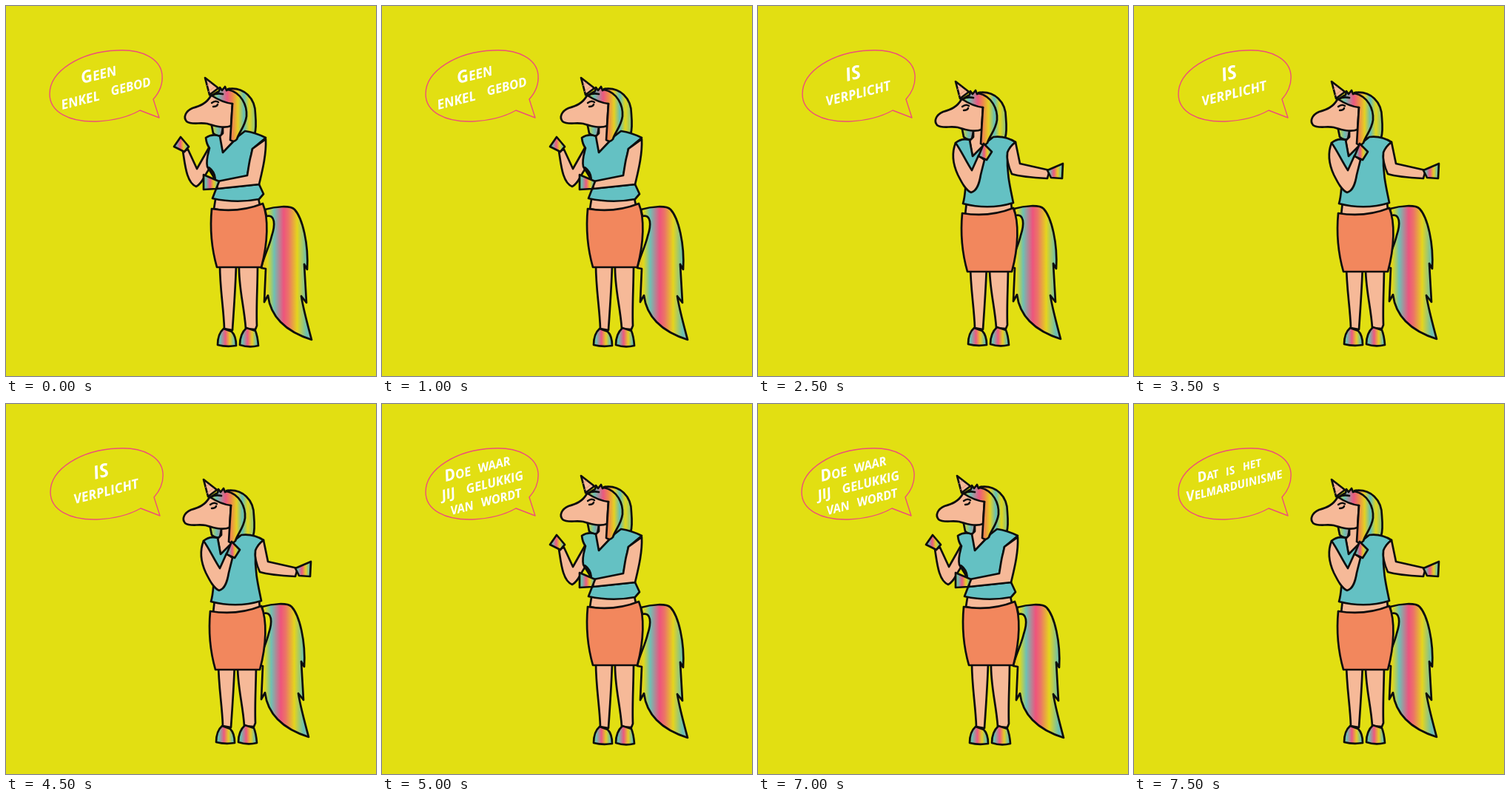
Animation, 500 px wide and 500 px high, one loop 8000 ms. Source, as an HTML page:

```html
<!DOCTYPE html>
<html lang="nl">
<head>
<meta charset="utf-8">
<title>Unicorn with speech bubble</title>
<style>
  html, body { margin: 0; width: 100%; height: 100%; overflow: hidden; background: #e2df12; }
  svg { display: block; width: 100vw; height: 100vh; }
  path { stroke: #0d0d0d; stroke-width: 2.7; stroke-linejoin: round; stroke-linecap: round; fill: none; }
  .skin { fill: #f6b998; }
  .teal { fill: #64c1c3; }
  .skirt { fill: #f2875d; }
  .rainbow { fill: url(#rainbow); }
  .tail { fill: url(#tailFill); }
  .hair { fill: url(#hairFill); }
  .bubble { stroke: #ee4f78; stroke-width: 1.4; }
  text { fill: #fff; font: italic 700 17px "Open Sans", "Noto Sans", sans-serif; }
</style>
</head>
<body>
<svg viewBox="0 0 500 500">
  <defs>
    <linearGradient id="rainbow">
      <stop offset="0" stop-color="#9dc66a"/>
      <stop offset=".14" stop-color="#69bfb4"/>
      <stop offset=".42" stop-color="#ed5a80"/>
      <stop offset=".67" stop-color="#e6cd23"/>
      <stop offset=".92" stop-color="#66bfb5"/>
      <stop offset="1" stop-color="#8fb0ab"/>
    </linearGradient>
    <linearGradient id="tailFill" gradientUnits="userSpaceOnUse" x1="349" x2="410" y1="0" y2="0">
      <stop offset="0" stop-color="#e2c41d"/>
      <stop offset=".07" stop-color="#e2d91a"/>
      <stop offset=".22" stop-color="#6fc0b2"/>
      <stop offset=".43" stop-color="#ee547d"/>
      <stop offset=".54" stop-color="#ec7466"/>
      <stop offset=".73" stop-color="#e5d41d"/>
      <stop offset=".94" stop-color="#68c0b2"/>
      <stop offset="1" stop-color="#80b6af"/>
    </linearGradient>
    <linearGradient id="hairFill" gradientUnits="userSpaceOnUse" x1="277" x2="338" y1="0" y2="0">
      <stop offset="0" stop-color="#e2d61b"/>
      <stop offset=".16" stop-color="#6dbfb4"/>
      <stop offset=".36" stop-color="#ec5880"/>
      <stop offset=".48" stop-color="#ee8a4c"/>
      <stop offset=".6" stop-color="#e5d021"/>
      <stop offset=".73" stop-color="#64c0b8"/>
      <stop offset=".85" stop-color="#e2d61b"/>
      <stop offset="1" stop-color="#79c295"/>
    </linearGradient>

    <path id="bubble" class="bubble" d="M181 141L207 151L199 126C208 116 212 105 211 93C209 72 185 58 150 60C100 62 59 88 59 119C59 143 85 157 122 156C145 155 165 150 181 141Z"/>

    <path id="tail" class="tail" d="M350 275C364 271 384 269 390 275C401 287 409 322 407 356L403 349L406 401L399 392C402 411 408 432 413 451C385 442 358 425 354 391L349 400L351 355L345 354C347 341 355 328 359 311C364 296 364 281 352 284Z"/>

    <g id="legs">
      <path class="skin" d="M289 350C289 382 294 407 295 436L306 438C308 408 310 383 311 350Z"/>
      <path class="skin" d="M315 350C314 380 322 406 324 436L337 437L339 432C338 405 340 380 340 350Z"/>
      <path class="rainbow" d="M294 436Q286 443 286 458Q298 461 311 459Q311 446 305 440Z"/>
      <path class="rainbow" d="M325 435Q316 443 316 458Q328 462 341 459Q340 446 337 439Z"/>
    </g>

    <path id="skirt" class="skirt" d="M278 274Q314 280 347 267C355 286 354 320 345 353H285C277 325 276 295 278 274Z"/>

    <g id="backHair">
      <path class="hair" d="M300 112C322 109 337 125 337 146C338 158 338 167 336 173L305 176L304 130Z"/>
      <path class="hair" d="M277 157L280 172Q285 177 291 175L294 160Z"/>
    </g>

    <g id="head">
      <path class="skin" d="M269 97L287 111L275 120Z"/>
      <path d="M271 108L276 104M273 116L282 109" style="stroke:#d98f76;stroke-width:.8"/>
      <path class="skin" d="M277 121C271 132 262 135 252 138C243 142 239 150 244 156C250 161 262 157 272 159C282 162 294 166 304 162L306 132L292 118Z"/>
      <path class="hair" style="stroke:none" d="M300 113C318 117 326 134 325 149C323 163 315 170 312 180Q308 185 303 181L306 132L294 124Z"/>
      <path class="hair" d="M306 132C297 131 287 127 278 121L288 115L289 110L292 114L296 109L298 114L302 112"/>
      <path d="M278 121Q285 117 293 119"/>
      <path d="M278 131Q283 127 287 130M280 136Q285 136 286 133" style="stroke-width:2.4"/>
      <path d="M300 113C318 117 326 134 325 149C323 163 315 170 312 180Q308 185 303 181L306 132"/>
    </g>
  </defs>

  <g class="pose">
    <use href="#bubble"/>
    <use href="#tail"/>
    <use href="#legs"/>
    <path class="skin" d="M284 255L281 274L312 279L343 269L340 255Z"/>
    <use href="#skirt"/>
    <use href="#backHair"/>
    <path class="skin" d="M293 160V172L287 178L293 200L316 173L304 161Z"/>
    <path class="skin" d="M239 196C242 215 244 239 257 244C265 240 267 231 274 221L275 190L258 220L246 194Z"/>
    <path class="teal" d="M270 178Q279 172 289 176L293 198L314 176L323 169Q337 171 351 178L333 193L326 230L284 240C283 232 277 226 272 217C270 208 273 200 275 192Q271 187 270 178Z"/>
    <path d="M274 219Q281 224 282 233" style="stroke-width:4"/>
    <path class="teal" d="M284 247L342 241L348 254L342 261Q311 267 279 260Z"/>
    <path class="skin" d="M351 180C352 201 346 224 342 241L285 247L286 237L326 229C328 217 329 208 331 202L333 193Z"/>
    <path class="rainbow" d="M267 228L288 237L284 247L267 248Z"/>
    <path class="rainbow" d="M236 177L247 190L241 197L227 190Z"/>
    <use href="#head"/>
  </g>

  <g class="pose" style="display:none">
    <use href="#bubble" x="1"/>
    <use href="#tail" x="-4" y="-1"/>
    <use href="#legs" x="-2" y="-1"/>
    <path class="skin" d="M282 264L280 282L312 286L343 276L342 264Z"/>
    <use href="#skirt" x="-2" y="6"/>
    <use href="#backHair" x="-2" y="5"/>
    <path class="skin" d="M291 165V177L286 182L290 204L316 180L302 166Z"/>
    <path class="teal" d="M267 185Q275 178 286 181L290 203L308 185L318 177Q334 175 348 184Q338 191 337 202C336 226 341 246 345 266Q312 276 277 267C280 257 280 247 281 238Z"/>
    <path class="skin" d="M348 184L354 213L394 222L391 233C372 232 356 231 343 227C338 216 336 206 337 198Q340 190 348 184Z"/>
    <path class="rainbow" d="M391 222L412 213L411 233L396 232Z"/>
    <use href="#head" x="-2" y="5"/>
    <path class="skin" d="M267 185C261 200 264 215 270 228C276 240 281 249 288 252C296 250 299 240 301 228L306 208L298 202L289 222C281 210 275 196 267 185Z"/>
    <path class="rainbow" d="M305 186L316 197L309 208L298 203Z"/>
  </g>

  <g id="words"></g>
</svg>
<script>
  const STEP = 500, LINE = 2500, LOOP = 8000;

  // Each word: x, baseline y, size, first-letter size, text
  const lines = [
    [[103, 105, 18, 23, "GEEN"], [76, 140, 18, 18, "ENKEL"], [143, 121, 17, 17, "GEBOD"]],
    [[120, 102, 25, 25, "IS"], [93, 135, 18, 18, "VERPLICHT"]],
    [[86, 105, 17, 22, "DOE"], [131, 93, 16.5, 16.5, "WAAR"], [82, 130, 19, 19, "JIJ"],
     [115, 121, 17, 17, "GELUKKIG"], [94, 150, 16.5, 16.5, "VAN"], [135, 139, 16.5, 16.5, "WORDT"]],
    [[87, 106, 15, 19, "DAT"], [125, 97, 15, 15, "IS"], [148, 90, 14.5, 14.5, "HET"],
     [72, 132, 15.5, 19, "VELMARDUINISME"]]
  ];

  const word = ([x, y, size, first, s]) =>
    `<text transform="translate(${x} ${y}) rotate(-14)" style="font-size:${size}px">` +
    `<tspan style="font-size:${first}px">${s[0]}</tspan>${s.slice(1)}</text>`;

  document.getElementById("words").innerHTML =
    lines.map(l => `<g class="line">${l.map(word).join("")}</g>`).join("");

  const poses = document.querySelectorAll(".pose");
  const texts = document.querySelectorAll(".line");
  const show = (list, n) => list.forEach((el, i) => el.style.display = i === n ? "" : "none");

  const start = performance.now();
  function draw() {
    const t = (performance.now() - start) % LOOP;
    show(poses, Math.floor(t / STEP) % 2);
    show(texts, Math.floor(t / LINE));
    requestAnimationFrame(draw);
  }
  draw();
</script>
</body>
</html>
```
